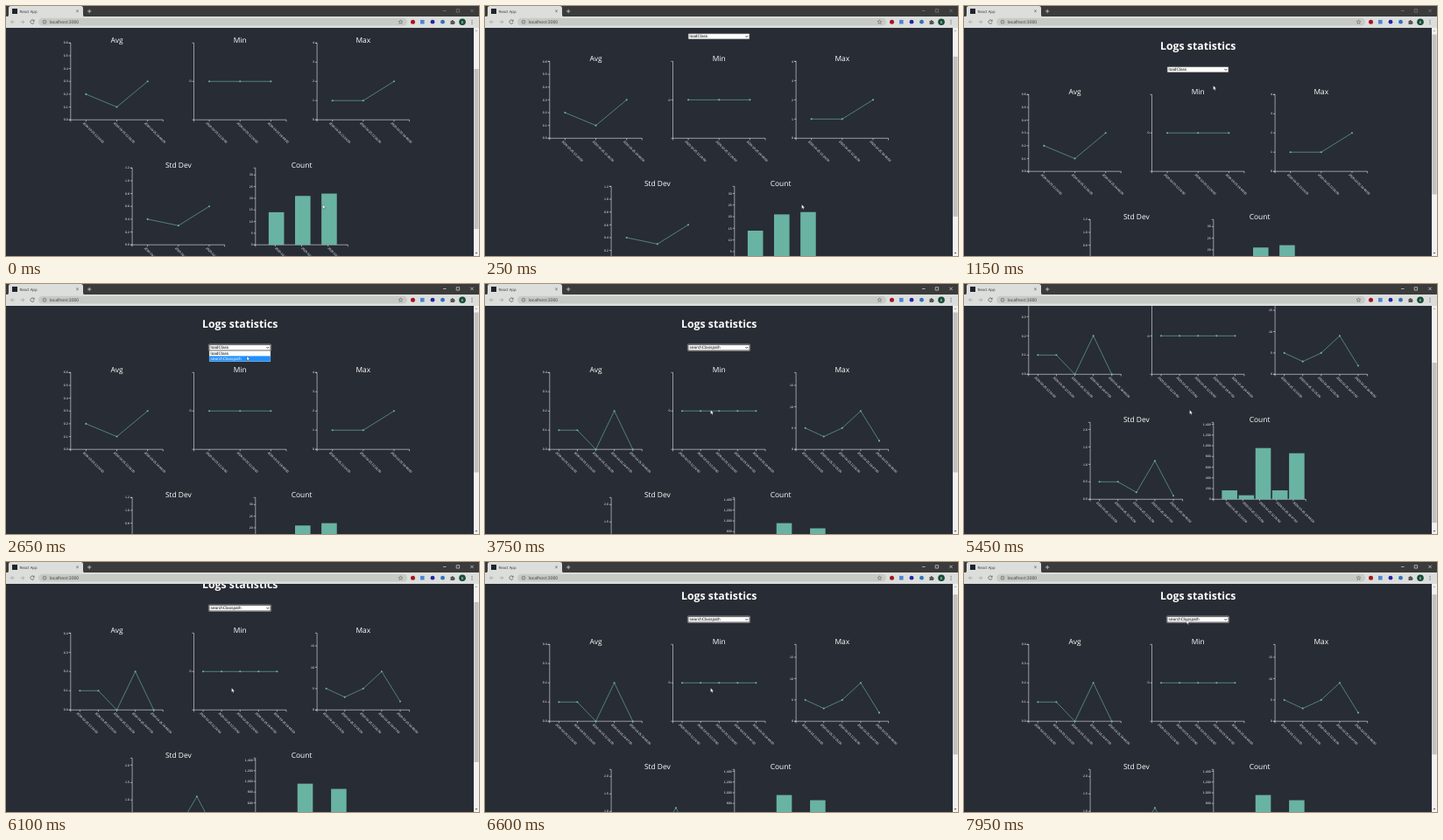
Animation of 540 by 286 pixels, one loop 8 s. Source, as an HTML page:

```html
<!DOCTYPE html>
<html lang="en">
<head>
<meta charset="utf-8">
<title>Logs statistics</title>
<style>
  html, body { margin: 0; width: 100%; height: 100%; overflow: hidden; background: #282c34; }
  svg { display: block; width: 540px; height: 286px; }
  text { text-rendering: geometricPrecision; font-family: "Liberation Sans", Arial, sans-serif; }
  .ui { font-family: "Open Sans", "Noto Sans", sans-serif; }
  .hidden { display: none; }
</style>
</head>
<body>
<svg viewBox="0 0 540 286">
  <rect width="540" height="286" fill="#282c34"/>

  <g id="page">
    <text class="ui" x="267.2" y="50.2" font-size="12.3" font-weight="700" fill="#fff" text-anchor="middle">Logs statistics</text>
    <rect id="focus" x="231.4" y="68.9" width="71.2" height="7.6" rx="1" fill="#101010" stroke="#d8d8d8" stroke-width=".5"/>
    <rect x="232.2" y="69.7" width="69.6" height="6" rx=".5" fill="#fff" stroke="#767676" stroke-width=".4"/>
    <text id="choice" x="233.6" y="74.4" font-size="4.7"></text>
    <path d="M297.4 72l1.4 1.5 1.4-1.5" fill="none" stroke="#111" stroke-width=".7"/>
    <g id="charts"></g>
    <g id="popup">
      <rect x="232" y="76.2" width="70" height="12.6" fill="#fff" stroke="#767676" stroke-width=".4"/>
      <rect id="hover" x="232.2" width="69.6" height="6" fill="#1e90ff"/>
      <text id="option0" x="233.6" y="81" font-size="4.7">loadClass</text>
      <text id="option1" x="233.6" y="87" font-size="4.7">searchClasspath</text>
    </g>
  </g>

  <g id="scrollbar">
    <rect x="534" y="25" width="6" height="261" fill="#f1f1f1"/>
    <path d="M535.6 29l1.4-1.6 1.4 1.6z" fill="#a3a3a3"/>
    <path d="M535.6 282l1.4 1.6 1.4-1.6z" fill="#505050"/>
    <rect id="thumb" x="534.4" width="5.2" height="183" fill="#c1c1c1"/>
  </g>

  <g id="browser">
    <rect width="540" height="13" fill="#3b3b3b"/>
    <path d="M1 12.5Q3 12 3 10V2.5Q3 0 5.5 0H85.500Q88 0 88 2.500V10Q88 12 90 12.500z" fill="#dcdedc"/>
    <rect y="12" width="540" height="13" fill="#dcdedc"/>
    <rect x="7" y="3" width="6" height="6" fill="#20232a"/>
    <text class="ui" x="15.500" y="7.600" font-size="4.300" fill="#333">React App</text>
    <path d="M80.200 4.500l2.600 2.600m0-2.600l-2.600 2.600M93 6h4.400m-2.200-2.200v4.400" stroke="#444" stroke-width=".6"/>
    <path d="M93 6h4.400m-2.200-2.200v4.400" stroke="#ddd" stroke-width=".7"/>
    <g id="controls" fill="none" stroke-width=".6">
      <path d="M499 5.500h3.600M514.200 3.700h3.400v3.400h-3.400zM530.300 3.700l3.400 3.400m0-3.400l-3.400 3.400"/>
    </g>
    <g fill="none" stroke-width=".7">
      <path d="M9.800 18.200H5.600m2-2l-2 2 2 2" stroke="#9a9c9a"/>
      <path d="M16.600 18.200h4.200m-2-2l2 2-2 2" stroke="#9a9c9a"/>
      <path d="M31.800 16.700a2.200 2.200 0 1 0 .4 2M32.200 15.600v1.700h-1.700" stroke="#555"/>
    </g>
    <rect x="37" y="13.800" width="421" height="8.800" rx="4.400" fill="#c7cbc6"/>
    <circle cx="44" cy="18.200" r="2" fill="none" stroke="#555" stroke-width=".6"/>
    <path d="M44 17.800v1.500m0-2.400v.4" stroke="#555" stroke-width=".5"/>
    <text class="ui" x="49.500" y="20" font-size="5" fill="#333">localhost:3000</text>
    <path d="M450.500 15.800l.7 1.600 1.700.2-1.300 1.100.4 1.700-1.500-.9-1.500.9.4-1.700-1.300-1.100 1.700-.2z" fill="none" stroke="#555" stroke-width=".5"/>
    <circle cx="464.500" cy="18.200" r="2.500" fill="#a3151d"/>
    <rect x="473" y="15.900" width="4.600" height="4.600" fill="#4a86d8"/>
    <circle cx="487" cy="18.200" r="2.400" fill="#2325a8"/>
    <circle cx="498.500" cy="18.200" r="2.400" fill="#2f72b8"/>
    <path d="M507.500 17h1.400v-1h1.500v1h1.500v1.400h.8v1.300h-.8v1.200h-4.400z" fill="#555"/>
    <circle cx="521" cy="18.200" r="3.800" fill="#174c38"/>
    <text x="521" y="19.600" font-size="4" fill="#fff" text-anchor="middle">E</text>
    <g fill="#444"><circle cx="532" cy="16.200" r=".55"/><circle cx="532" cy="18.200" r=".55"/><circle cx="532" cy="20.200" r=".55"/></g>
  </g>

  <path id="cursor" d="M0 0v5l1.150-1 .8 1.800.85-.4-.8-1.700h1.600z" fill="#fff" stroke="#111" stroke-width=".3"/>
</svg>

<script>
const LOOP = 8000;
const UNIT = 540 / 1536;            // page pixel to stage pixel
const WIDTH = 300, HEIGHT = 250;    // plot size in page pixels
const TEAL = '#69b3a2';
const $ = id => document.getElementById(id);

const datasets = [
  { name: 'loadClass',
    times: ['12:24', '12:26', '16:48'],
    charts: {
      Avg: [[.2, .1, .3], .6, .1],
      Min: [[0, 0, 0], 0, 1],
      Max: [[1, 1, 2], 4, 1],
      'Std Dev': [[.4, .3, .6], 1.2, .2],
      Count: [[14, 21, 22], 33, 5]
    } },
  { name: 'searchClasspath',
    times: ['12:24', '12:25', '12:26', '16:47', '16:48'],
    charts: {
      Avg: [[.1, .1, 0, .2, 0], .4, .1],
      Min: [[0, 0, 0, 0, 0], 0, 1],
      Max: [[5, 3, 5, 9, 2], 18, 5],
      'Std Dev': [[.5, .5, .2, 1.1, .1], 2.2, .5],
      Count: [[167, 75, 957, 167, 860], 1435, 200]
    } }
];

// Left edge and top of each plot on the stage
const places = {
  Avg: [73.8, 101.3], Min: [214.5, 101.3], Max: [355.1, 101.3],
  'Std Dev': [144.1, 244.3], Count: [284.8, 244.3]
};

function drawChart(title, [values, top, step], times) {
  const [left, y0] = places[title];
  const isBar = title === 'Count';
  const n = values.length;
  const y = v => top ? HEIGHT * (1 - v / top) : HEIGHT / 2;
  const band = WIDTH / (isBar ? n + .5 : n);
  const x = i => band * (i + (isBar ? .75 : .5));
  const format = v => step < 1 ? v.toFixed(1) : v.toLocaleString('en-US');

  let axis = `M-6 0H0V${HEIGHT}H-6M0 ${HEIGHT + 6}V${HEIGHT}H${WIDTH}v6`;
  let labels = '';
  for (let i = 0; i * step <= top + 1e-6; i++) {
    const v = i * step;
    axis += `M-6 ${y(v)}H0`;
    labels += `<text x="-9" y="${y(v) + 3.4}" text-anchor="end">${format(v)}</text>`;
  }
  times.forEach((time, i) => {
    axis += `M${x(i)} ${HEIGHT}v6`;
    labels += `<text y="16" transform="translate(${x(i) + (isBar ? 10 : 0)} ${HEIGHT}) rotate(45)">2020-10-25 ${time}:00</text>`;
  });

  const marks = isBar
    ? values.map((v, i) => `<rect x="${band * (i + .5)}" y="${y(v)}" width="50" height="${HEIGHT - y(v)}"/>`).join('')
    : `<polyline fill="none" stroke="${TEAL}" stroke-width="1.8" points="${values.map((v, i) => [x(i), y(v)]).join(' ')}"/>`
      + values.map((v, i) => `<circle cx="${x(i)}" cy="${y(v)}" r="3"/>`).join('');

  return `<g transform="translate(${left} ${y0}) scale(${UNIT})">
    <text class="ui" x="150" y="-1" font-size="24" fill="#fff" text-anchor="middle">${title}</text>
    <path d="${axis}" fill="none" stroke="#fff" stroke-width="1.5"/>
    <g font-size="10" fill="#fff">${labels}</g>
    <g fill="${TEAL}">${marks}</g>
  </g>`;
}

$('charts').innerHTML = datasets.map(({ charts, times }, i) =>
  `<g id="set${i}">${Object.entries(charts).map(([title, spec]) => drawChart(title, spec, times)).join('')}</g>`
).join('');

// Keyframes: [time, value, ...]
const scrollKeys = [
  [50, 59], [250, 38], [450, 17], [650, 5], [800, 0],
  [4550, 0], [4750, 24], [5000, 62], [5200, 80], [5350, 86],
  [5450, 86], [5650, 68], [5900, 38], [6100, 20], [6300, 12], [6600, 7]
];
const cursorKeys = [
  [800, 361.5, 227], [1150, 284.5, 91], [1400, 286, 72], [2050, 286, 72],
  [2500, 278, 78], [2700, 274, 84], [2900, 274, 84], [3400, 257.5, 144],
  [6750, 257.5, 144], [7450, 259, 72], [7600, 259, 72], [7900, 254, 66]
];

function sample(keys, t) {
  const next = keys.findIndex(key => key[0] > t);
  if (next === 0) return keys[0].slice(1);
  if (next < 0) return keys[keys.length - 1].slice(1);
  const a = keys[next - 1], b = keys[next];
  const p = (t - a[0]) / (b[0] - a[0]);
  return a.slice(1).map((v, i) => v + (b[i + 1] - v) * p);
}

const show = (id, visible) => $(id).classList.toggle('hidden', !visible);

function render(t) {
  const [scroll] = sample(scrollKeys, t);
  const [cx, cy] = sample(cursorKeys, t);
  const active = t >= 1500;
  const selected = t >= 2800 ? 1 : 0;
  const hovered = t >= 2650 ? 1 : 0;

  $('page').setAttribute('transform', `translate(0 ${-scroll})`);
  $('thumb').setAttribute('y', 32.5 + scroll * .67);
  $('cursor').setAttribute('transform', `translate(${cx} ${cy})`);
  $('controls').setAttribute('stroke', active ? '#f2f2f2' : '#8a8a8a');
  $('choice').textContent = datasets[selected].name;
  $('hover').setAttribute('y', 76.4 + hovered * 6);
  [0, 1].forEach(i => {
    show('set' + i, i === selected);
    $('option' + i).setAttribute('fill', i === hovered ? '#fff' : '#000');
  });
  show('focus', active);
  show('popup', active && !selected);
}

const start = performance.now();
function frame() {
  render((performance.now() - start) % LOOP);
  requestAnimationFrame(frame);
}
frame();
</script>
</body>
</html>
```
